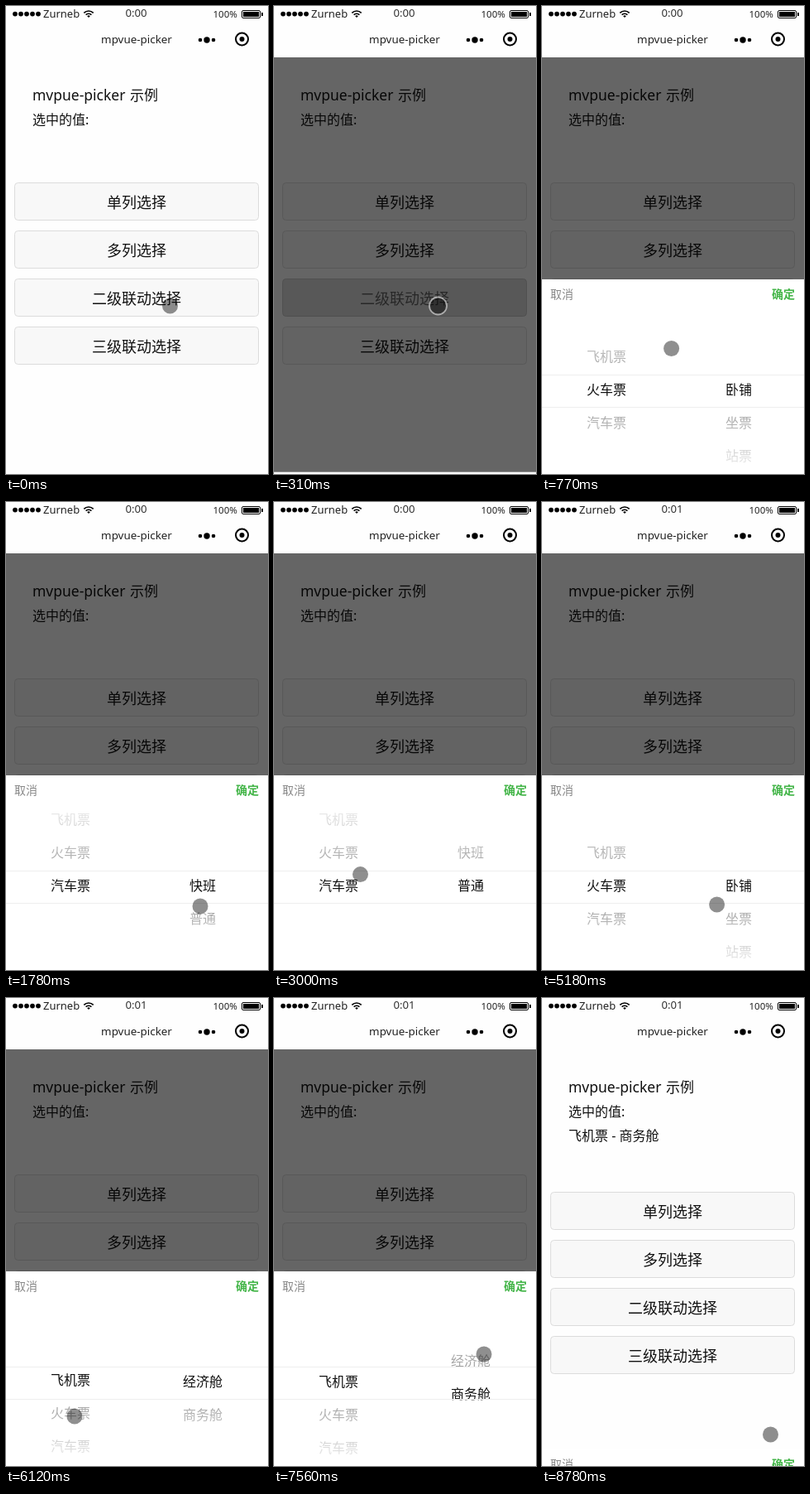
An HTML page for the animation above (8870 ms loop, 317x565 px).

```html
<!DOCTYPE html>
<html lang="zh-CN">
<head>
<meta charset="utf-8">
<title>mpvue-picker</title>
<style>
  html, body { margin: 0; width: 100%; height: 100%; overflow: hidden; background: #fefefe; }
  svg { display: block; font-family: "Noto Sans", "Noto Sans CJK SC", "Noto Sans CJK", sans-serif; }
  .mid { text-anchor: middle; }
  .body { font-weight: 350; fill: #111; }
</style>
</head>
<body>
<svg width="317" height="565" viewBox="0 0 317 565">
  <defs>
    <linearGradient id="fade" x1="0" y1="0" x2="0" y2="1">
      <stop offset="0" stop-color="#fff" stop-opacity=".95"/>
      <stop offset="1" stop-color="#fff" stop-opacity=".6"/>
    </linearGradient>
    <clipPath id="wheelClip"><rect y="365" width="317" height="200"/></clipPath>
  </defs>
  <rect width="317" height="565" fill="#fefefe"/>

  <g class="body">
    <text x="32" y="114" font-size="17.5">mvpue-picker<tspan x="150" font-size="17">示例</tspan></text>
    <text x="32" y="143" font-size="16">选中的值:</text>
    <text id="result" x="32" y="172" font-size="16">飞机票 - 商务舱</text>
    <g id="buttons" class="mid" font-size="18"></g>
  </g>
  <rect id="mask" y="62" width="317" height="503" opacity=".6"/>

  <g id="sheet">
    <rect y="330" width="317" height="235" fill="#fff"/>
    <text x="10" y="352.5" font-size="14" fill="#888">取消</text>
    <text x="278" y="352.5" font-size="14" font-weight="700" fill="#44b549">确定</text>
    <g clip-path="url(#wheelClip)" font-size="16" class="mid body">
      <g id="left"></g>
      <g id="right"></g>
    </g>
    <rect y="365" width="317" height="80" fill="url(#fade)"/>
    <rect width="317" height="80" fill="url(#fade)" transform="matrix(1 0 0 -1 0 565)"/>
    <path d="M0 445.5H317M0 484.5H317" stroke="#eee"/>
  </g>

  <g id="signal"></g>
  <text x="45" y="13.5" font-size="13" fill="#222">Zurneb</text>
  <path d="M94.3 8.3a8.2 8.2 0 0 1 11.4 0M96.6 10.7a5 5 0 0 1 6.8 0" fill="none" stroke="#000" stroke-width="1.7"/>
  <path d="M98.2 12.2a2.6 2.6 0 0 1 3.6 0L100 14Z"/>
  <text id="clock" class="mid" x="157.5" y="13" font-size="13.2" fill="#333"></text>
  <text x="250.5" y="14" font-size="11.5" fill="#222">100%</text>
  <rect x="285.5" y="5.5" width="22" height="9" rx="1.5" fill="none" stroke="#000"/>
  <path d="M287 7h19v6h-19zM309 8h2v4h-2z"/>
  <text class="mid" x="158" y="45" font-size="13.4" fill="#222">mpvue-picker</text>
  <circle cx="235" cy="41" r="2.3"/>
  <circle cx="243" cy="41" r="3.7"/>
  <circle cx="251" cy="41" r="2.3"/>
  <circle cx="285.5" cy="40" r="7.5" fill="none" stroke="#000" stroke-width="2"/>
  <circle cx="285.5" cy="40" r="3"/>

  <circle id="cursor" fill-opacity=".44" stroke-width="1.8"/>
</svg>
<script>
const LOOP = 8870;
const ROW = 40;
const SLIDE = 300;
const GLIDE = 480;
const SHEET_HEIGHT = 235;
const OPEN_AT = 305;
const CONFIRM_AT = 8550;

const $ = id => document.getElementById(id);
const clamp = (v, lo, hi) => Math.min(hi, Math.max(lo, v));
const mix = (a, b, k) => a + (b - a) * k;

function set(el, attrs) {
  for (const key in attrs) el.setAttribute(key, attrs[key]);
}
function add(parent, tag, attrs, text = '') {
  const el = document.createElementNS('http://www.w3.org/2000/svg', tag);
  set(el, attrs);
  el.textContent = text;
  return parent.appendChild(el);
}
const show = (el, on) => set(el, { visibility: on ? 'visible' : 'hidden' });
const shift = (el, dy) => set(el, { transform: `translate(0 ${dy})` });

function progress(t, start, end) {
  const u = clamp((t - start) / (end - start), 0, 1);
  return u * u * (3 - 2 * u);
}

// The CSS "ease" curve, cubic-bezier(.25, .1, .25, 1); its x(s) is solved by bisection.
function ease(x) {
  x = clamp(x, 0, 1);
  let lo = 0, hi = 1;
  for (let i = 0; i < 20; i++) {
    const s = (lo + hi) / 2;
    if (.75 * s * (1 - s) + s ** 3 < x) lo = s; else hi = s;
  }
  return .3 * lo * (1 - lo) ** 2 + 3 * lo * lo * (1 - lo) + lo ** 3;
}

const groups = [
  ['飞机票', ['经济舱', '商务舱']],
  ['火车票', ['卧铺', '坐票', '站票']],
  ['汽车票', ['快班', '普通']]
];

// Presses of the pointer; those on a wheel drag it and let it settle on a row.
const tap = (start, end, point) => ({ start, end, from: point, to: point });
const drag = (wheel, row, start, end, from, to) => ({ wheel, row, start, end, from, to });
const gestures = [
  tap(80, 390, [198.5, 362]),
  drag('left', 2, 1150, 1350, [88, 498], [90, 458]),
  drag('right', 1, 1860, 2400, [235, 488], [262, 414]),
  drag('left', 1, 3200, 3940, [85, 454], [105, 510]),
  drag('right', 0, 4730, 5080, [240, 447], [238, 488]),
  drag('left', 0, 5580, 5960, [72, 475], [83, 505]),
  drag('right', 1, 6750, 7555, [270, 455], [254, 430]),
  tap(8150, CONFIRM_AT, [293.5, 350]),
  tap(LOOP, LOOP, [276.5, 527])
];
const wheels = { left: { row: 1, last: 2 }, right: { row: 0, last: 1 } };

function pointerAt(t) {
  const i = gestures.findIndex(g => t < g.end);
  const { start, end, from, to } = gestures[i];
  const along = (a, b, k) => a.map((v, axis) => mix(v, b[axis], k));
  if (t >= start || i === 0) return along(from, to, progress(t, start, end));
  const prev = gestures[i - 1];
  const arrive = start - 100;
  return along(prev.to, from, progress(t, Math.max(prev.end, arrive - GLIDE), arrive));
}

function scrollAt(name, t) {
  const { row, last } = wheels[name];
  let scroll = row * ROW;
  for (const g of gestures) {
    if (g.wheel !== name || t < g.start) continue;
    const raw = scroll - (g.to[1] - g.from[1]) * progress(t, g.start, g.end);
    const inside = clamp(raw, 0, last * ROW);
    const held = mix(inside, raw, .25);
    scroll = mix(held, g.row * ROW, ease((t - g.end) / SLIDE));
  }
  return scroll;
}

// The right wheel gets its new list shortly after the left one is let go.
function groupAt(t) {
  const settled = gestures.filter(g => g.wheel === 'left' && t >= g.end + 100).pop();
  return settled ? settled.row : wheels.left.row;
}

for (let i = 0; i < 5; i++) add($('signal'), 'circle', { cx: 11 + 7 * i, cy: 9.6, r: 2.9 });

const buttons = ['单列选择', '多列选择', '二级联动选择', '三级联动选择'].map((label, i) => {
  const y = 213 + 58 * i;
  return {
    box: add($('buttons'), 'rect', { x: 10.5, y: y + .5, width: 295, height: 45, rx: 4 }),
    label: add($('buttons'), 'text', { x: 158, y: y + 30.5 }, label)
  };
});

function makeColumn(parent, x, labels) {
  const column = add(parent, 'g', {});
  labels.forEach((label, i) => add(column, 'text', { x, y: 469 + ROW * i }, label));
  return column;
}
makeColumn($('left'), 78, groups.map(g => g[0]));
const lists = groups.map(g => makeColumn($('right'), 238, g[1]));

function draw(t) {
  const done = t >= CONFIRM_AT;
  show($('result'), done);
  shift($('buttons'), done ? 21 : 0);
  show($('mask'), t >= OPEN_AT && !done);

  buttons.forEach(({ box, label }, i) => {
    const active = i === 2 && t >= 230 && t < 470;
    set(box, { fill: active ? '#dedede' : '#f8f8f8', stroke: active ? '#c6c6c6' : '#dcdcdc' });
    set(label, { opacity: active ? .6 : 1 });
  });

  const opened = ease((t - OPEN_AT) / SLIDE) - ease((t - CONFIRM_AT - 35) / SLIDE);
  shift($('sheet'), SHEET_HEIGHT * (1 - opened));
  for (const name in wheels) shift($(name), -scrollAt(name, t));
  lists.forEach((list, i) => show(list, i === groupAt(t)));

  $('clock').textContent = t < 4300 ? '0:00' : '0:01';

  const [cx, cy] = pointerAt(t);
  const down = gestures.some(g => t >= g.start && t < g.end);
  set($('cursor'), { cx, cy, r: down ? 10.5 : 9.5, stroke: down ? 'rgba(255,255,255,.55)' : 'none' });
}

const start = performance.now();
function tick() {
  draw((performance.now() - start) % LOOP);
  requestAnimationFrame(tick);
}
draw(0);
requestAnimationFrame(tick);
</script>
</body>
</html>
```
